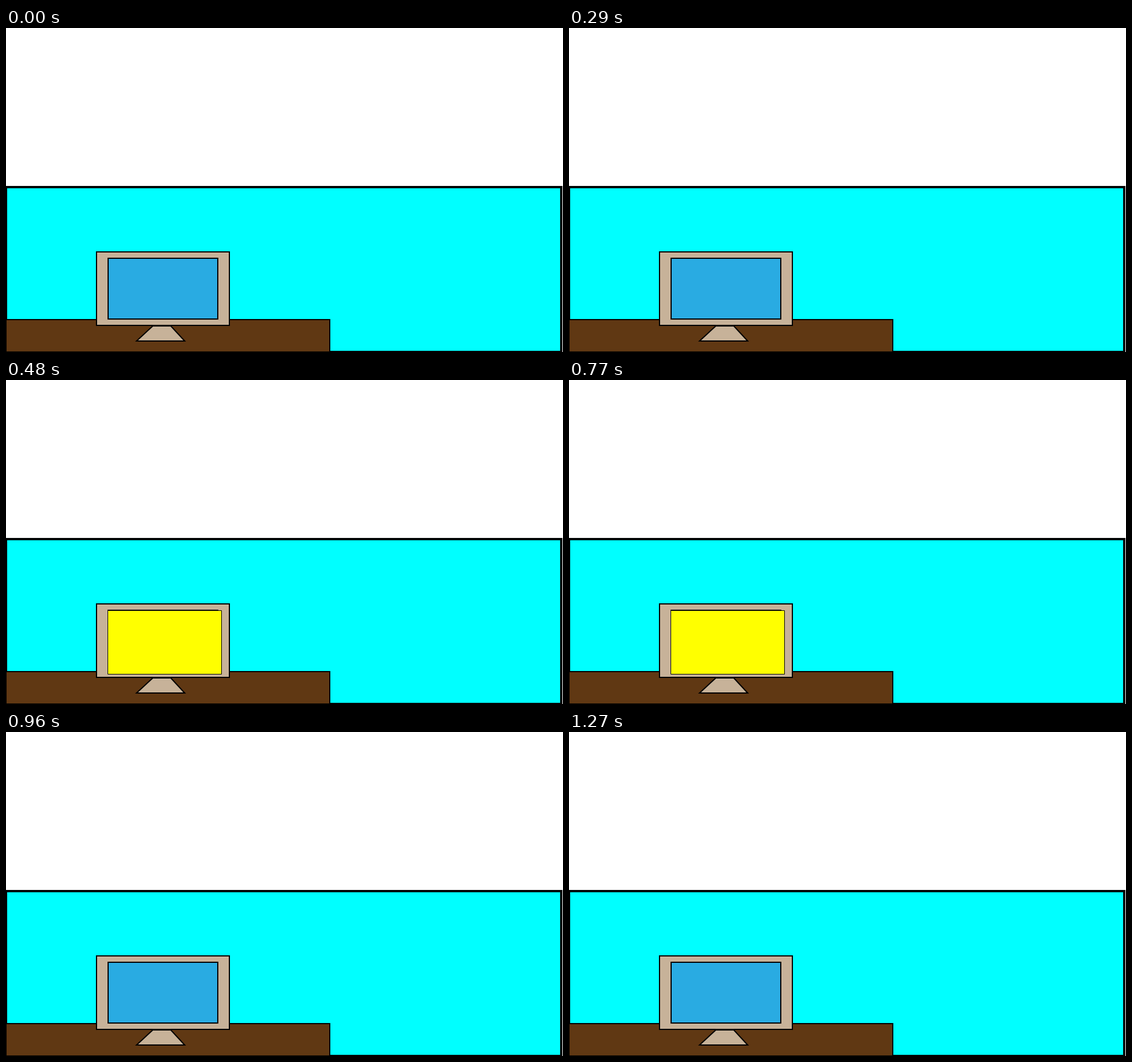
These frames come from a looping animation (960 by 560 pixels, 1480 ms). An HTML page with a canvas:

```html
<!DOCTYPE html>
<html lang="en">
<head>
<meta charset="utf-8">
<title>Blinking monitor</title>
<style>
  html, body { margin: 0; width: 100%; height: 100%; overflow: hidden; background: #fff; }
  canvas { display: block; }
</style>
</head>
<body>
<canvas id="stage" width="960" height="560"></canvas>
<script>
const ctx = document.getElementById("stage").getContext("2d");
const LOOP = 1480, FLASH_START = 480, FLASH_END = 960;
const BEIGE = "#c7b299";

function shape(points, fill, lineWidth) {
  ctx.beginPath();
  for (const [x, y] of points) ctx.lineTo(x, y);
  ctx.closePath();
  ctx.fillStyle = fill;
  ctx.fill();
  ctx.strokeStyle = "#000";
  ctx.lineWidth = lineWidth;
  ctx.stroke();
}

function box(left, top, right, bottom, fill, lineWidth) {
  shape([[left, top], [right, top], [right, bottom], [left, bottom]], fill, lineWidth);
}

function draw(time) {
  ctx.fillStyle = "#fff";
  ctx.fillRect(0, 0, 960, 560);

  box(0, 275, 957, 560, "#00ffff", 4);  // wall
  box(0, 504, 558, 560, "#603813", 2);  // desk
  box(156, 387, 385, 514, BEIGE, 2);    // monitor
  shape([[253, 515], [284, 515], [308, 541], [225, 541]], BEIGE, 2);
  box(176, 398, 365, 503, "#29abe2", 2);

  if (time >= FLASH_START && time < FLASH_END) {
    box(175.5, 398.5, 371.5, 508.5, "#ffff00", 1);
  }
}

const start = performance.now();

function tick() {
  draw((performance.now() - start) % LOOP);
  requestAnimationFrame(tick);
}
tick();
</script>
</body>
</html>
```
